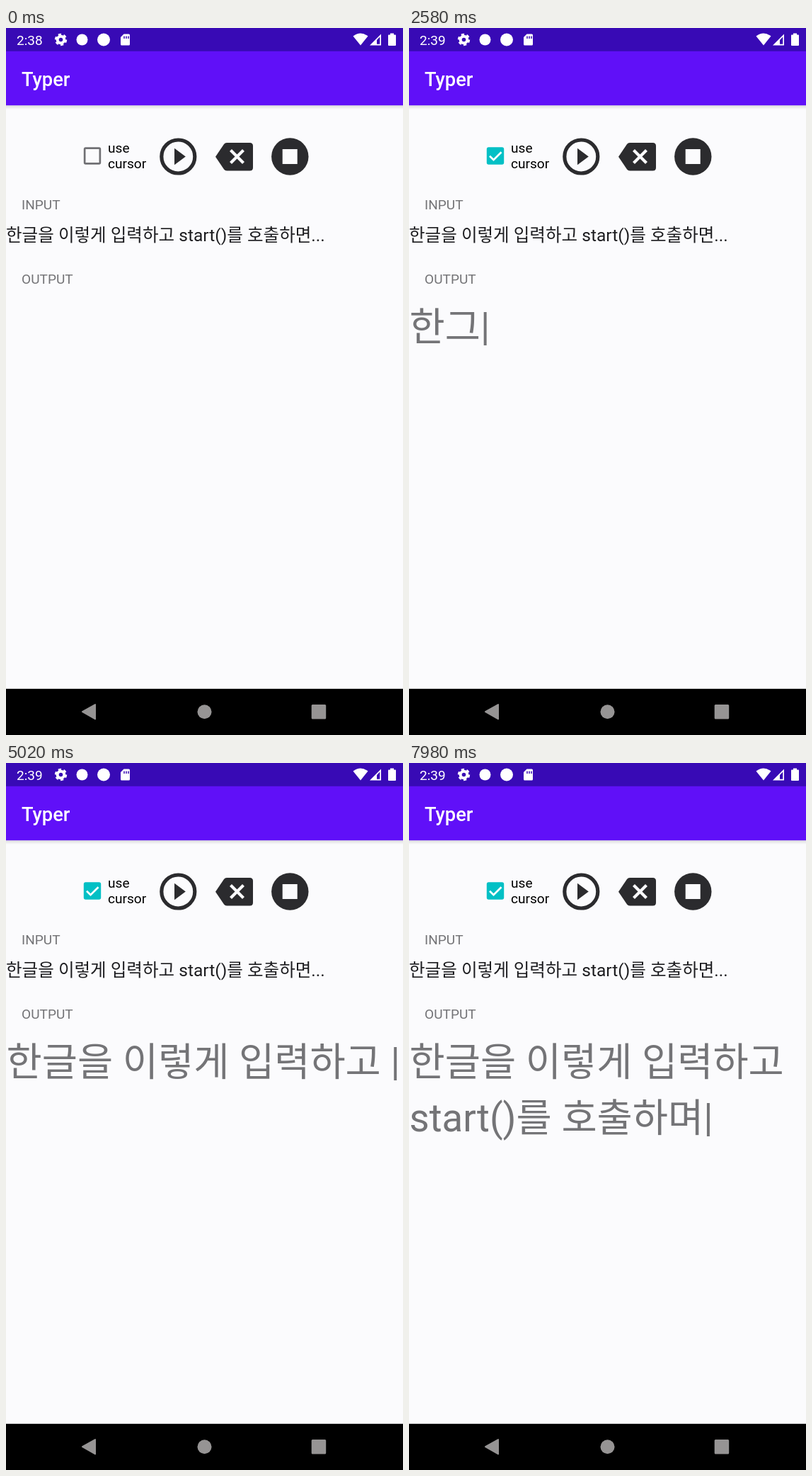
These frames come from a looping animation (561 px wide and 998 px high, 8 s). An HTML page:

```html
<!DOCTYPE html>
<html lang="ko">
<head>
<meta charset="utf-8">
<title>Typer</title>
<style>
html, body { margin: 0; width: 100%; height: 100%; overflow: hidden; background: #fbfbfd; }
svg { display: block; }
text { font-family: Roboto, "Noto Sans CJK KR", "Noto Sans CJK", sans-serif; white-space: pre; }
.small { font-size: 19.1px; }
.label { fill: #747477; }
.input { font-size: 24.57px; fill: #1d1d20; }
.output { font-size: 54.6px; fill: #747477; }
</style>
</head>
<body>
<svg width="561" height="998" viewBox="0 0 561 998">
  <defs>
    <linearGradient id="shade" x2="0" y2="1">
      <stop stop-color="#000" stop-opacity=".13"/>
      <stop offset="1" stop-color="#000" stop-opacity="0"/>
    </linearGradient>
    <radialGradient id="finger">
      <stop stop-color="#fff" stop-opacity=".3"/>
      <stop offset=".72" stop-color="#f0f2fa" stop-opacity=".55"/>
      <stop offset=".86" stop-color="#a6aec8" stop-opacity=".75"/>
      <stop offset="1" stop-color="#a6aec8" stop-opacity="0"/>
    </radialGradient>
  </defs>

  <rect width="561" height="998" fill="#fbfbfd"/>
  <rect y="109" width="561" height="6" fill="url(#shade)"/>
  <rect y="32" width="561" height="77.2" fill="#6010f8"/>
  <rect width="561" height="32.8" fill="#380ab5"/>
  <text x="22" y="81.5" font-size="27.3" font-weight="500" fill="#fff">Typer</text>

  <!-- status bar -->
  <g fill="#fff">
    <text id="clock" class="small" x="15" y="23.7">2:38</text>
    <g fill="none" stroke="#fff">
      <circle cx="77.5" cy="16.5" r="4.8" stroke-width="4"/>
      <circle cx="77.5" cy="16.5" r="7.4" stroke-width="2.6" stroke-dasharray="4.2 3.55"/>
    </g>
    <circle cx="107.5" cy="16.5" r="8"/>
    <circle cx="138" cy="16.5" r="9"/>
    <path d="M166.500 8.500H173.500Q175 8.500 175 10V23Q175 24.500 173.500 24.500H163.500Q162 24.500 162 23V13Z"/>
    <path d="M167 11.500v3.500M170 11.500v3.500M173 11.500v3.500" stroke="#380ab5" stroke-width="1.5"/>
    <path d="M490.500 11.500Q501 3.500 511.500 11.500L501 24.500Z"/>
    <path d="M514 24.500L530 8.500V24.500ZM524 16.900V22.800H528.300V12.600Z" fill-rule="evenodd"/>
    <path d="M540 10.500Q540 9.500 541 9.500H543V7.500H548V9.500H550Q551 9.500 551 10.500V24Q551 25 550 25H541Q540 25 540 24Z"/>
  </g>

  <!-- controls -->
  <circle id="ripple" cx="122" cy="180.500" r="27" fill="#000"/>
  <g id="box">
    <rect id="frame" x="-12.200" y="-12.200" width="24.400" height="24.400" rx="2.700"/>
    <rect id="hole" fill="#fbfbfd"/>
    <path id="tick" d="M-8 .2L-2.500 5.700L8.500 -5.300" fill="none" stroke="#fff" stroke-width="2.700"/>
  </g>
  <text class="small" x="144" y="176">use</text>
  <text class="small" x="144" y="198.300">cursor</text>
  <g fill="#2b2b2e">
    <circle cx="243.300" cy="181.500" r="23.500" fill="none" stroke="#2b2b2e" stroke-width="5.200"/>
    <path d="M238 169.700V193.300L253.800 181.500Z"/>
    <path d="M312 162H344.500Q349 162 349 166.500V197Q349 201.500 344.500 201.500H312Q309.500 201.500 308 199.500L296 181.700L308 164Q309.500 162 312 162Z"/>
    <path d="M317.500 172.500L335.500 190.500M335.500 172.500L317.500 190.500" stroke="#fbfbfd" stroke-width="4.200"/>
    <circle cx="401.300" cy="181.500" r="26.200"/>
    <rect x="390.700" y="171" width="21" height="21" fill="#fbfbfd"/>
  </g>

  <text class="small label" x="22" y="255.700">INPUT</text>
  <text class="input" y="301">한글을 이렇게 입력하고 start()를 호출하면...</text>
  <text class="small label" x="22" y="361.400">OUTPUT</text>
  <text class="output" x=".5" y="441"></text>
  <text class="output" x=".5" y="520.400"></text>
  <circle id="touch" r="17" fill="url(#finger)"/>

  <!-- navigation bar -->
  <rect y="932.800" width="561" height="65.200" fill="#000"/>
  <g fill="#969494">
    <path d="M108 965.200L126 955V975.400Z" stroke="#969494" stroke-width="2" stroke-linejoin="round"/>
    <circle cx="280.500" cy="965.200" r="10"/>
    <rect x="431.700" y="955" width="20.500" height="20.500" rx="1.500"/>
  </g>
</svg>
<script>
const LOOP = 8000;
const PHRASE = '한글을 이렇게 입력하고 \nstart()를 호출하면';
// Moment of each keystroke; equal times appear together.
const KEYS = [
  2020, 2120, 2380, 2460, 2540, 2620, 2700, 2820, 2820,
  2980, 3020, 3220, 3280, 3280, 3340, 3460, 3540,
  3740, 3780, 3860, 3940, 4020, 4100, 4300, 4380, 4620, 4620, 4820,
  5020, 5380, 5580, 5780, 5980, 6180, 6220, 6420,
  6620, 6820, 6820, 6860, 7060, 7260, 7300, 7380, 7580, 7660, 7780, 7860, 7980
];

const $ = id => document.getElementById(id);
const set = (el, attrs) => {
  for (const key in attrs) el.setAttribute(key, attrs[key]);
};
const ramp = (t, from, to) => Math.min(1, Math.max(0, (t - from) / (to - from)));
const ease = x => 1 - (1 - x) ** 2;

// A syllable grows from its initial consonant to vowel to final consonant.
function strokes(char) {
  const n = char.charCodeAt(0) - 0xAC00;
  if (n < 0 || n > 11171) return [char];
  const tail = n % 28;
  const parts = [String.fromCharCode(0x1100 + Math.floor(n / 588)),
                 String.fromCharCode(0xAC00 + n - tail)];
  return tail ? [...parts, char] : parts;
}

const typed = [];
let done = '';
for (const char of PHRASE) {
  if (char !== '\n') for (const s of strokes(char)) typed.push(done + s);
  done += char;
}

const lines = document.querySelectorAll('.output');
let shown = null;

function drawOutput(t) {
  const count = KEYS.filter(k => k <= t).length;
  const text = count ? typed[count - 1] + '|' : '';
  if (text === shown) return;
  shown = text;
  const rows = text.split('\n');
  lines.forEach((line, i) => line.textContent = rows[i] || '');
}

function drawCheckbox(t) {
  const fill = ramp(t, 620, 745);
  const tick = ease(ramp(t, 735, 900));
  const scale = 1 - .08 * fill + .08 * ramp(t, 760, 900);
  const half = 9.5 * (1 - fill);
  set($('box'), { transform: `translate(122 180.500) scale(${scale})` });
  set($('frame'), { fill: t < 640 ? '#707074' : '#03c0c5' });
  set($('hole'), { x: -half, y: -half, width: 2 * half, height: 2 * half });
  set($('tick'), { transform: `scale(${tick})`, opacity: tick ? 1 : 0 });
  set($('ripple'), {
    r: 27 * ease(ramp(t, 500, 700)),
    opacity: .11 * ramp(t, 500, 560) * (1 - ramp(t, 900, 1180))
  });
}

function drawTouch(t) {
  const second = t >= 1500;
  const opacity = second
    ? (t >= 1780 ? 1 - ramp(t, 1940, 2060) : 0)
    : (t >= 500 ? 1 - ramp(t, 700, 820) : 0);
  set($('touch'), { cx: second ? 250.500 : 127, cy: second ? 190.500 : 181, opacity });
}

function frame(now) {
  const t = now % LOOP;
  $('clock').textContent = t < 1000 ? '2:38' : '2:39';
  drawCheckbox(t);
  drawTouch(t);
  drawOutput(t);
  requestAnimationFrame(frame);
}
frame(0);
</script>
</body>
</html>
```
